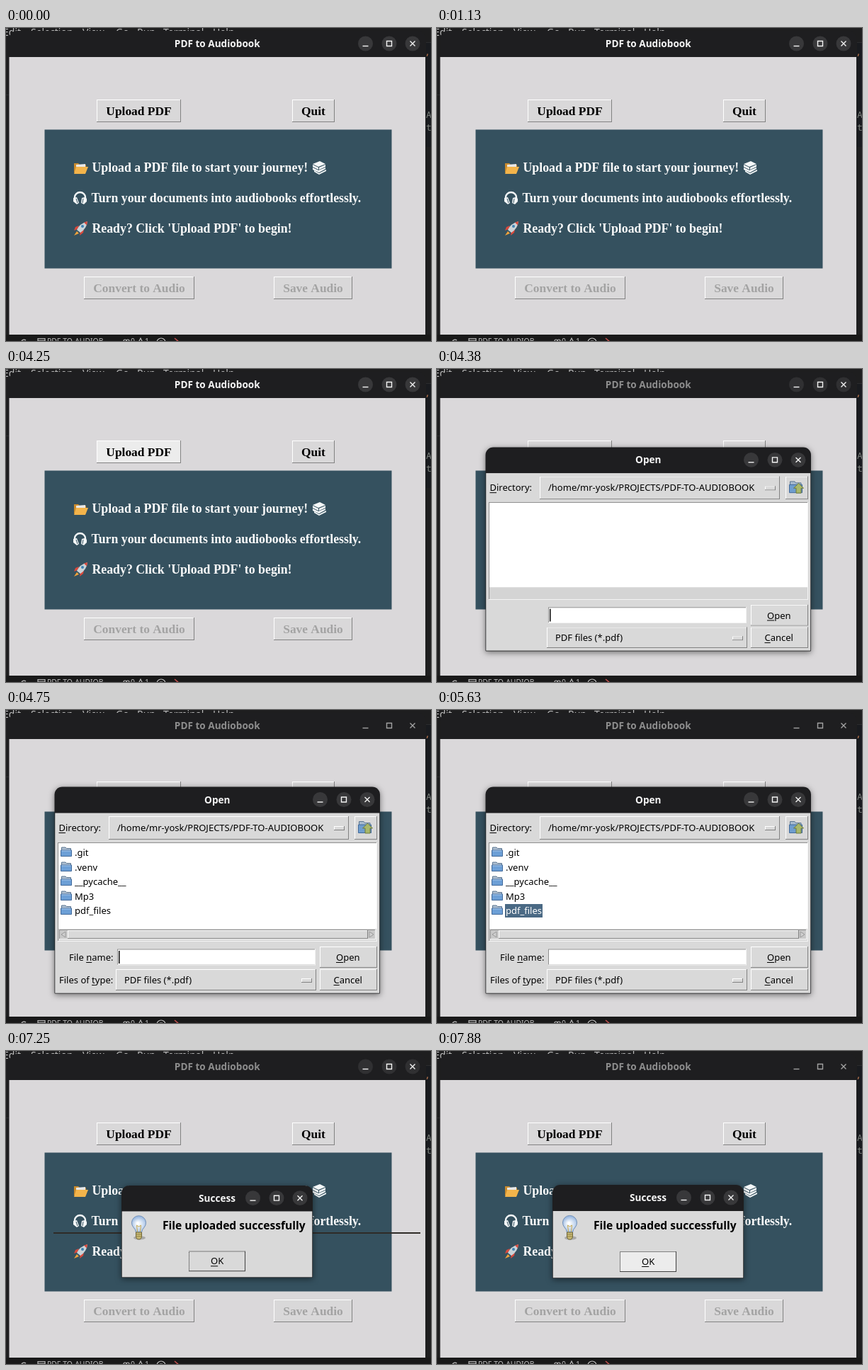
An HTML page with a canvas for the animation above (8 s loop, 600x442 px).

```html
<!DOCTYPE html>
<html lang="en">
<head>
<meta charset="utf-8">
<title>PDF to Audiobook</title>
<style>
html, body { margin: 0; height: 100%; overflow: hidden; background: #1e1e1f; }
canvas { display: block; }
</style>
</head>
<body>
<canvas id="stage" width="600" height="442"></canvas>
<script>
const ctx = document.getElementById('stage').getContext('2d');
const LOOP = 8000, STEP = 125;
const SANS = '13px "Noto Sans", sans-serif';
const TITLE = 'bold 13.6px "Noto Sans", sans-serif';
const BUTTON = 'bold 17.4px "Liberation Serif", serif';
const BODY = 'bold 17.8px "Liberation Serif", serif';
const FACE = '#d9d9d9', ACTIVE = '#ececec', SELECT = '#4a6984';
const HOME = '/home/mr-yosk/PROJECTS/PDF-TO-AUDIOBOOK';

// ---- basic helpers ----
function rect(x, y, w, h, color) {
  ctx.fillStyle = color;
  ctx.fillRect(x, y, w, h);
}

function text(str, x, y, font = SANS, color = '#000', align = 'left') {
  ctx.font = font;
  ctx.fillStyle = color;
  ctx.textAlign = align;
  ctx.fillText(str, x, y);
}

// Left-aligned label with one underlined letter.
function label(str, x, y, key) {
  text(str, x, y);
  const before = ctx.measureText(str.slice(0, key)).width;
  rect(x + before, y + 2, ctx.measureText(str[key]).width, 1, '#000');
}

function bevel(x, y, w, h, fill = FACE, raised = true) {
  const light = raised ? '#fff' : '#8e8e8e', dark = raised ? '#828282' : '#f4f4f4';
  rect(x, y, w, h, dark);
  rect(x, y, w - 1, h - 1, light);
  rect(x + 1, y + 1, w - 2, h - 2, fill);
}

function shape(path, fill, stroke, width = 1) {
  const p = new Path2D(path);
  if (fill) { ctx.fillStyle = fill; ctx.fill(p); }
  if (stroke) { ctx.strokeStyle = stroke; ctx.lineWidth = width; ctx.stroke(p); }
}

function at(x, y, draw) {
  ctx.save();
  ctx.translate(x, y);
  draw();
  ctx.restore();
}

function stretchY(center, scale, draw) {
  at(0, center, () => {
    ctx.scale(1, scale);
    ctx.translate(0, -center);
    draw();
  });
}

// Vertical growth of a freshly opened dialog.
function grow(t, start) {
  const p = Math.min(1, Math.max(0, (t - start) / 142));
  return 1 - (1 - p) ** 2;
}

// ---- windows ----
function windowFrame(x, y, w, h, title, focus = 1, shadow = true) {
  ctx.save();
  if (shadow) {
    ctx.shadowColor = 'rgba(0,0,0,.5)';
    ctx.shadowBlur = 9;
    ctx.shadowOffsetY = 2;
  }
  ctx.beginPath();
  ctx.roundRect(x, y, w, h, [11, 11, 1, 1]);
  ctx.fillStyle = '#1e1e20';
  ctx.fill();
  ctx.restore();
  const edge = shadow ? 0.75 : 0;
  rect(x + edge, y + 37, w - 2 * edge, h - 37 - edge, shadow ? FACE : '#dad8da');

  const tone = focus === 1 ? '#f4f4f4' : '#8d8d8d';
  text(title, x + w / 2, y + 23, TITLE, tone, 'center');
  const glyph = focus > 0 ? '#f4f4f4' : '#a2a2a2';
  [84.5, 51, 18].forEach((inset, i) => at(x + w - inset, y + 18, () => {
    if (focus > 0) {
      ctx.beginPath();
      ctx.arc(0, 0, 10.5, 0, 7);
      ctx.fillStyle = focus === 1 ? '#38383a' : '#303032';
      ctx.fill();
    }
    const marks = ['M-4 3.5H4', 'M-3.5 -3.5H3.5V3.5H-3.5Z', 'M-3.5 -3.5L3.5 3.5M3.5 -3.5L-3.5 3.5'];
    shape(marks[i], null, glyph, 1.4);
  }));
}

function desktop() {
  rect(0, 0, 600, 442, '#1e1e1f');
  rect(593, 20, 7, 148, '#191b1f');
  rect(593, 20, 7, 1, '#2c2c2e');
  rect(0, 94, 5, 1, '#2c2c2e');
  rect(0, 433, 600, 9, '#191919');
  const menu = { Edit: -4, Selection: 35, View: 108, Go: 155, Run: 185, Terminal: 222, Help: 292 };
  for (const [name, x] of Object.entries(menu)) text(name, x, 11, '14px "Noto Sans", sans-serif', '#bdbdbd');
  const mono = '13px "Noto Sans Mono", monospace';
  text(',', 591, 38, mono, '#c07a50');
  text('A', 593, 127, mono, '#7c817c');
  text('t', 593, 145, mono, '#7c817c');
  const small = '10.4px "Noto Sans", sans-serif';
  text('PDF-TO-AUDIOB', 58, 446, small, '#bdbdbd');
  text('0', 176, 446, small, '#bdbdbd');
  text('1', 196, 446, small, '#bdbdbd');
  shape('M22 442a4 4 0 0 1 6 -1M45 448V438.500H55V448M45 441H55M166 442a2 2 0 1 1 4 0a2 2 0 1 1 4 0' +
        'M186 446L190 438L194 446M213 444a6 6 0 0 1 12 0M217 442H221', null, '#bdbdbd', 1.2);
  shape('M238 438L245 444', null, '#c0504d', 1.6);
}

// ---- pictograms ----
function openFolder() {
  shape('M1 2H7L9 4H18V15H1Z', '#c98a2c');
  shape('M4 4L17 3V14H4Z', '#e8e8e8');
  shape('M4 7H21L17 17H1Z', '#f3b44b');
}

function books() {
  shape('M1 4L11 0L19 4L9 8ZM1 5L9 9V12L1 8ZM10 9L19 5V8L10 12Z', '#f4f7f8');
  shape('M1 9L9 13L19 9V11L10 16L1 12ZM3 13L10 17L20 12V14L10 19L3 15Z', '#f4f7f8');
}

function headphones() {
  shape('M3 11V8a7.500 7 0 0 1 15 0V11', null, '#f4f7f8', 2.4);
  shape('M1 9L6 8L9 16L6 18L1 14ZM13 9L17 8L20 10V14L16 18L12 16Z', '#f4f7f8');
  shape('M5 10L7 16M15 10L14 16', null, '#35515f', 1);
}

function rocket() {
  shape('M3 8L8 6L6 11L1 13ZM10 14L15 11L14 16L9 20Z', '#d9493c');
  shape('M5 12Q9 3 20 0Q19 10 10 16Z', '#c9d3d8');
  shape('M15 1.500L20 0L19 5.500Z', '#d9493c');
  shape('M11 7a2 2 0 1 0 4 0a2 2 0 1 0 -4 0', '#3e83b5');
  shape('M5 14L8 17L1 20Z', '#f2a33a');
}

function folder() {
  shape('M1.500 6V1H7L8.500 2.500H14.500V6Z', '#aebfd0', '#5a7591');
  shape('M.5 5H15.500V13.500H.5Z', '#6c9fd6', '#41699a');
  shape('M1.500 6H14.500', null, '#a9caee');
}

function sheet() {
  shape('M.5 .5H13.500V14.500H.5Z', '#f7f7f7', '#85888a');
  shape('M3 4H11M3 6.500H11M3 9H11M3 11.500H8', null, '#b5b7b8');
}

function upFolder() {
  shape('M1.500 7V1.500H8L9.500 3.500H17V7Z', '#a9bccf', '#5a7591');
  shape('M.5 6H18.500V17.500H.5Z', '#6f9dce', '#41699a');
  shape('M13.500 4L20.500 11H17V18H10V11H6.500Z', '#a9b86a', '#6d7a3c');
}

function bulb() {
  shape('M3 29a8 2.500 0 0 0 17 0a8 2.500 0 0 0 -17 0', 'rgba(0,0,0,.22)');
  const glass = ctx.createRadialGradient(9, 8, 1, 11, 11, 12);
  glass.addColorStop(0, '#fff');
  glass.addColorStop(1, '#9dbbe2');
  shape('M6.500 21Q6 17 3 14A10 10 0 1 1 18 14Q15 17 14.500 21Z', glass, '#6f8fb8');
  shape('M8.500 20L7.500 11L10.500 13L13.500 11L12.500 20', null, '#c8a84a');
  shape('M6.500 21H14.500V28L12.500 31H8.500L6.500 28Z', '#c9b974', '#6d6436');
  shape('M6.500 24H14.500M6.500 27H14.500', null, '#8a7e45');
}

// ---- main application ----
function mainWindow(hover, focus) {
  windowFrame(4.5, 4, 587.5, 429, 'PDF to Audiobook', focus, false);
  const button = (str, x, y, w, enabled, fill = '#d9d8d9') => {
    bevel(x, y, w, 32, fill);
    text(str, x + w / 2, y + 21.5, BUTTON, enabled ? '#000' : '#a3a3a3', 'center');
  };
  button('Upload PDF', 128, 101, 119, true, hover ? ACTIVE : undefined);
  button('Quit', 404, 101, 60, true);
  button('Convert to Audio', 110, 351, 156, false);
  button('Save Audio', 378, 351, 111, false);

  rect(54.5, 143.5, 490, 196, '#35515f');
  const line = (str, x, y) => text(str, x, y, BODY, '#fbfbfb');
  line('Upload a PDF file to start your journey!', 121.5, 203);
  line('Turn your documents into audiobooks effortlessly.', 120.5, 246);
  line("Ready? Click 'Upload PDF' to begin!", 121.5, 289);
  at(95, 189, openFolder);
  at(432, 188, books);
  at(94, 231, headphones);
  at(95, 273, rocket);
}

// ---- file chooser ----
function menuButton(str, x, y, w, h, baseline) {
  bevel(x, y, w, h);
  text(str, x + 12, baseline);
  bevel(x + w - 21, Math.round(y + h / 2 - 2.5), 15, 6);
}

function fileDialog({ extra, ready, inFolder, picked, caret, hoverOpen }) {
  windowFrame(68.5, 108.5, 459.5 + extra, 292, 'Open');
  label('Directory:', 74.5, 171, 0);
  menuButton(HOME + (inFolder ? '/pdf_files' : ''), 145, 150, 339 + extra, 33, 171);
  bevel(492 + extra, 150, 32, 33);
  at(497 + extra, 156, upFolder);

  bevel(73, 187, 451 + extra, 140, '#fff', false);
  rect(74, 309, 449 + extra, 17, ready ? FACE : '#d4d4d4');
  if (ready) {
    bevel(75, 310, 447 + extra, 14, '#c9c9c9', false);
    bevel(87, 311, 424 + extra, 12);
    const arrow = 'M-3 0L3 -4V4Z';
    at(81, 317, () => shape(arrow, '#d0d0d0', '#999'));
    at(516 + extra, 317, () => { ctx.scale(-1, 1); shape(arrow, '#d0d0d0', '#999'); });
    const names = inFolder ? ['acknoledgement.pdf'] : ['.git', '.venv', '__pycache__', 'Mp3', 'pdf_files'];
    names.forEach((name, i) => {
      const y = Math.round(192 + i * 20.5);
      at(77, y + 1, inFolder ? sheet : folder);
      ctx.font = SANS;
      if (name === picked) rect(96, y, ctx.measureText(name).width + 2, 19, SELECT);
      text(name, 97, y + 14, SANS, name === picked ? '#fff' : '#000');
    });
    label('File name:', 89, 354, 5);
    label('Files of type:', 75, 386, 9);
  }

  bevel(157, 337.5, 280 + extra, 23, '#fff', false);
  if (inFolder && picked) text(picked, 159.5, 354);
  if (caret) rect(159, 340, 1.5, 18, '#000');
  menuButton('PDF files (*.pdf)', 155, 366, 283 + extra, 30, 386);
  bevel(443 + extra, 334, 81, 30, hoverOpen ? ACTIVE : FACE);
  bevel(443 + extra, 366, 81, 30);
  label('Open', 466 + extra, 354, 0);
  label('Cancel', 462.5 + extra, 386, 0);
}

// ---- confirmation ----
function successDialog(hover) {
  windowFrame(163, 189, 270, 132, 'Success');
  at(177, 235, bulb);
  text('File uploaded successfully', 221, 252, 'bold 15.6px "Noto Sans", sans-serif');
  bevel(258, 283, 80, 29, hover ? ACTIVE : FACE);
  ctx.setLineDash([1, 1]);
  ctx.strokeStyle = '#000';
  ctx.lineWidth = 1;
  ctx.strokeRect(258.5, 283.5, 79, 28);
  ctx.setLineDash([]);
  label('OK', 289, 302, 0);
}

function render(time) {
  const t = Math.floor(time % LOOP / STEP) * STEP;
  const between = (a, b) => t >= a && t < b;
  const fading = between(4375, 4500) || between(7250, 7375);
  const focus = t < 4375 ? 1 : fading ? 0.5 : 0;

  desktop();
  mainWindow(between(3125, 4375), focus);

  if (between(4375, 7250)) {
    const inFolder = t >= 5875;
    stretchY(255, grow(t, 4250), () => fileDialog({
      extra: inFolder ? 56 : 0,
      ready: t >= 4500,
      inFolder,
      picked: between(5625, 5875) ? 'pdf_files' : t >= 6375 ? 'acknoledgement.pdf' : '',
      caret: between(4375, 5000) || between(5250, 5625),
      hoverOpen: t >= 6750
    }));
  }
  if (t >= 7250) {
    // The closing chooser has collapsed to a thin line.
    if (t < 7375) rect(67, 256, 518, 2, '#2f2b27');
    stretchY(255, grow(t, 7125), () => successDialog(t >= 7875));
  }
}

function tick() {
  render(performance.now());
  requestAnimationFrame(tick);
}
tick();
</script>
</body>
</html>
```
